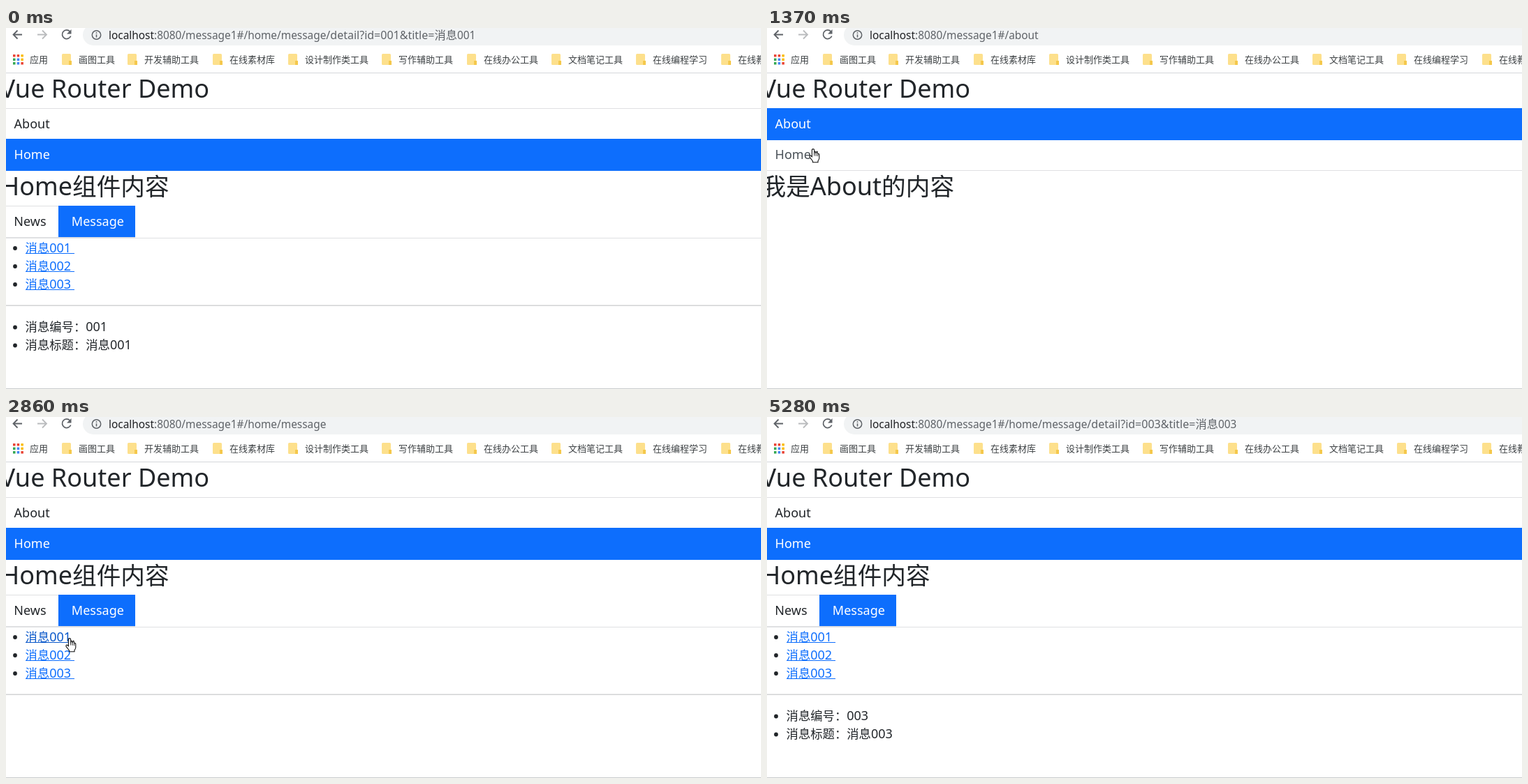
An HTML page with a canvas for the animation above (5590 ms loop, 1081 by 518 pixels).

```html
<!DOCTYPE html>
<html lang="zh-CN">
<head>
<meta charset="utf-8">
<title>Vue Router Demo</title>
<style>
  html, body { margin: 0; width: 100%; height: 100%; overflow: hidden; background: #fff; }
  canvas { display: block; }
</style>
</head>
<body>
<canvas id="stage" width="1081" height="518"></canvas>
<script>
const W = 1081, H = 518, LOOP = 5590;
const ctx = document.getElementById('stage').getContext('2d');
const BLUE = '#0d6efd', DARK_BLUE = '#0a58ca', INK = '#212529', BORDER = '#dfe0e2';
const FONTS = '"Noto Sans", "Open Sans", "Noto Sans CJK SC", sans-serif';
const HAN_FONTS = '"Noto Sans CJK SC", "Noto Sans CJK", "Noto Sans CJK JP", sans-serif';
const BODY = 17.33, TITLE = 34.67;

// Start time, page and selected message.
const pages = [
  [0, 'detail', 1], [850, 'about'], [1460, 'home'], [2310, 'message'],
  [3160, 'detail', 1], [3870, 'detail', 2], [4580, 'detail', 3]
];
const clicks = [[760, 850], [1380, 1460], [2230, 2310], [3100, 3160], [3790, 3870], [4500, 4580]];

const easeIn = p => p * p;
const easeOut = p => 1 - (1 - p) ** 2;
const easeInOut = p => p * p * (3 - 2 * p);

// First step, last step, number of steps, destination of the pointer tip, easing.
const entry = { x: 897, y: 547 };
const moves = [
  [70, 680, 9, 114, 139, easeOut],
  [910, 1300, 6, 66, 174, easeInOut],
  [1540, 2150, 9, 138, 274, easeInOut],
  [2460, 2860, 6, 91, 318, easeInOut],
  [2940, 3010, 2, 90, 319, easeInOut],
  [3330, 3470, 3, 83, 339, easeInOut],
  [3620, 3620, 1, 81, 338, easeInOut],
  [4110, 4260, 3, 79, 365, easeInOut],
  [4810, 5280, 7, 1414, 555, easeIn]
];
const bookmarks = [
  [104, '画图工具'], [198, '开发辅助工具'], [320, '在线素材库'], [428, '设计制作类工具'],
  [562, '写作辅助工具'], [684, '在线办公工具'], [805, '文档笔记工具'],
  [926, '在线编程学习'], [1048, '在线教程']
];

function rect(x, y, w, h, color) {
  ctx.fillStyle = color;
  ctx.fillRect(x, y, w, h);
}

function dot(x, y, r, color) {
  ctx.fillStyle = color;
  ctx.beginPath();
  ctx.arc(x, y, r, 0, Math.PI * 2);
  ctx.fill();
}

function stroke(path, color, width) {
  ctx.strokeStyle = color;
  ctx.lineWidth = width;
  ctx.stroke(new Path2D(path));
}

// Draws mixed Han and Latin runs and returns the end position.
function text(str, x, y, size, color, latinScale = 1.04) {
  ctx.fillStyle = color;
  for (const run of str.match(/[\u2e80-\uffff]+|[^\u2e80-\uffff]+/g)) {
    const han = run.charCodeAt(0) >= 0x2e80;
    ctx.font = han ? `${size}px ${HAN_FONTS}` : `${size * latinScale}px ${FONTS}`;
    ctx.fillText(run, x, y);
    x += ctx.measureText(run).width;
  }
  return x;
}

const label = n => '00' + n;

function pageAt(t) {
  const [, name, id] = pages.filter(p => p[0] <= t).pop();
  return { name, id };
}

// The pointer advances in even time steps along each eased move.
function pointerAt(t) {
  let { x, y } = entry;
  for (const [start, end, steps, tx, ty, ease] of moves) {
    if (t < start) break;
    const gap = (end - start) / Math.max(1, steps - 1) || 1;
    const p = ease(Math.min(steps, Math.floor((t - start) / gap + 1e-6) + 1) / steps);
    x += (tx - x) * p;
    y += (ty - y) * p;
  }
  return { x, y };
}

function targetAt({ x, y }, page) {
  if (y >= 115 && y < 160) return 'about';
  if (y >= 160 && y < 205) return 'home';
  if (page.name === 'about') return '';
  if (y >= 256 && y < 300 && x < 185) return x < 75 ? 'news' : 'message';
  if (page.name !== 'home' && x >= 28 && x < 98 && y >= 304 && y < 380) {
    return 'link' + (1 + Math.min(2, Math.floor((y - 304) / 26)));
  }
  return '';
}

function drawAddress({ name, id }) {
  const url = (str, x, color = '#5f6368', scale = 0.948) => text(str, x, 15.5, 16.25, color, scale);
  const path = { about: '/about', home: '/home' }[name] || '/home/message';
  let x = url('localhost', 147, '#202124');
  x = url(':8080/message1#' + path, x);
  if (name !== 'detail') return;
  x = url(`/detail?id=${label(id)}&title=`, x, '#5f6368', 0.985);
  url('消息' + label(id), x);
}

function drawBrowser(page) {
  stroke('M23 9.5H10.5M16.5 3.5L10.5 9.5L16.5 15.5', '#5f6368', 1.8);
  stroke('M45 9.5H58M52 3.5L58 9.5L52 15.5', '#babcbe', 1.8);
  stroke('M91.5 5A6.3 6.3 0 1 0 92.7 11.5', '#5f6368', 1.8);
  ctx.fillStyle = '#5f6368';
  ctx.fill(new Path2D('M93.5 2V8.5H87Z'));

  ctx.fillStyle = '#f1f3f4';
  ctx.beginPath();
  ctx.roundRect(110, -5, 1000, 30, 15);
  ctx.fill();
  stroke('M123.3 10a6.2 6.2 0 1 0 12.4 0a6.2 6.2 0 1 0 -12.4 0M129.5 9.2V13.5', '#5f6368', 1.5);
  rect(128.7, 6.2, 1.6, 1.6, '#5f6368');
  drawAddress(page);

  const palette = ['#ea4335', '#ea4335', '#fbbc04', '#34a853', '#4285f4', '#fbbc04', '#34a853', '#4285f4', '#ea4335'];
  palette.forEach((c, i) => rect(10 + i % 3 * 5.7, 38 + Math.floor(i / 3) * 5.5, 3.5, 3.5, c));
  text('应用', 34, 50, 13, '#3c4043');
  for (const [x, name] of bookmarks) {
    ctx.fillStyle = '#fde08c';
    ctx.beginPath();
    ctx.roundRect(x - 24, 37, 13, 16, 1.5);
    ctx.fill();
    rect(x - 14, 47, 4, 6, '#f5c84c');
    text(name, x, 50, 13, '#3c4043');
  }
  rect(0, 64, W, 1, '#d5d7da');
}

function drawRow(name, y, active, hovered) {
  if (active) rect(0, y, W, 46, BLUE);
  text(name, 11.6, y + 29.3, BODY, active ? '#fff' : hovered ? '#495057' : INK);
}

function drawTabs(active, target) {
  rect(0, 255, 185, 1, BORDER);
  rect(0, 301, W, 1, BORDER);
  rect(0, 300, 185, 1, BORDER);
  rect(75, 255, 1, 45, BORDER);
  rect(184, 255, 1, 45, BORDER);
  if (active) rect(75, 255, 110, 45, BLUE);
  const color = name => target === name ? DARK_BLUE : INK;
  text('News', 11.3, 284, BODY, color('news'));
  text('Message', 93.8, 284, BODY, active ? '#fff' : color('message'));
}

function drawMessages(target) {
  for (let i = 1; i <= 3; i++) {
    const y = 295.5 + i * 26;
    const color = target === 'link' + i ? DARK_BLUE : BLUE;
    dot(13, y - 5.5, 2.9, INK);
    text('消息' + label(i), 27.6, y, BODY, color);
    rect(28, Math.round(y + 1.6), 70, 1, color);
  }
  rect(0, 397.5, W, 1.4, '#cfd0d1');
}

function drawDetail(id) {
  ['消息编号：' + label(id), '消息标题：消息' + label(id)].forEach((line, i) => {
    const y = 435 + i * 26;
    dot(13, y - 5.5, 2.9, INK);
    text(line, 27.6, y, BODY, INK);
  });
}

function drawPage(page, target) {
  const about = page.name === 'about';
  text('Vue Router Demo', -8.4, 99.5, TITLE, INK);
  rect(0, 115, W, 1, BORDER);
  rect(0, 204, W, 1, BORDER);
  drawRow('About', 115, about, target === 'about');
  drawRow('Home', 159, !about, target === 'home');
  text(about ? '我是About的内容' : 'Home组件内容', -7.5, 240, TITLE, INK);
  if (!about) {
    const open = page.name !== 'home';
    drawTabs(open, target);
    if (open) drawMessages(target);
    if (page.name === 'detail') drawDetail(page.id);
  }
  rect(0, 517, W, 1, '#c9cbcd');
}

const ARROW = new Path2D('M0 0V16.5L3.8 13L6.3 19L9 17.8L6.5 12H11.7Z');
const HAND = new Path2D('M-1.6 11V1.2Q-1.6-.4 0-.4T1.7 1.2V6Q3-.2 4.2 6.2Q6-.4 6.7 7Q9 5.5 8.8 9V13Q8.4 15 7 16.6V18.8H-.5V17L-5 11.2Q-5.4 8.6-3.2 9.2Z');

function drawPointer({ x, y }, hand, clicking) {
  if (clicking) {
    ctx.globalCompositeOperation = 'multiply';
    dot(x - 1, y, 13, '#fffc58');
    ctx.globalCompositeOperation = 'source-over';
  }
  ctx.save();
  ctx.translate(x, y);
  const shape = hand ? HAND : ARROW;
  ctx.fillStyle = '#fff';
  ctx.fill(shape);
  ctx.strokeStyle = '#111';
  ctx.lineWidth = 1.1;
  ctx.lineJoin = 'round';
  ctx.stroke(shape);
  if (hand) stroke('M1.7 6V9.5M4.2 6.5V9.8M6.7 7.5V10', '#111', 0.9);
  ctx.restore();
}

function frame() {
  const t = performance.now() % LOOP;
  const page = pageAt(t);
  const pointer = pointerAt(t);
  const target = targetAt(pointer, page);
  rect(0, 0, W, H, '#fff');
  drawBrowser(page);
  drawPage(page, target);
  drawPointer(pointer, target !== '', clicks.some(([a, b]) => t >= a && t < b));
  requestAnimationFrame(frame);
}
frame();
</script>
</body>
</html>
```
